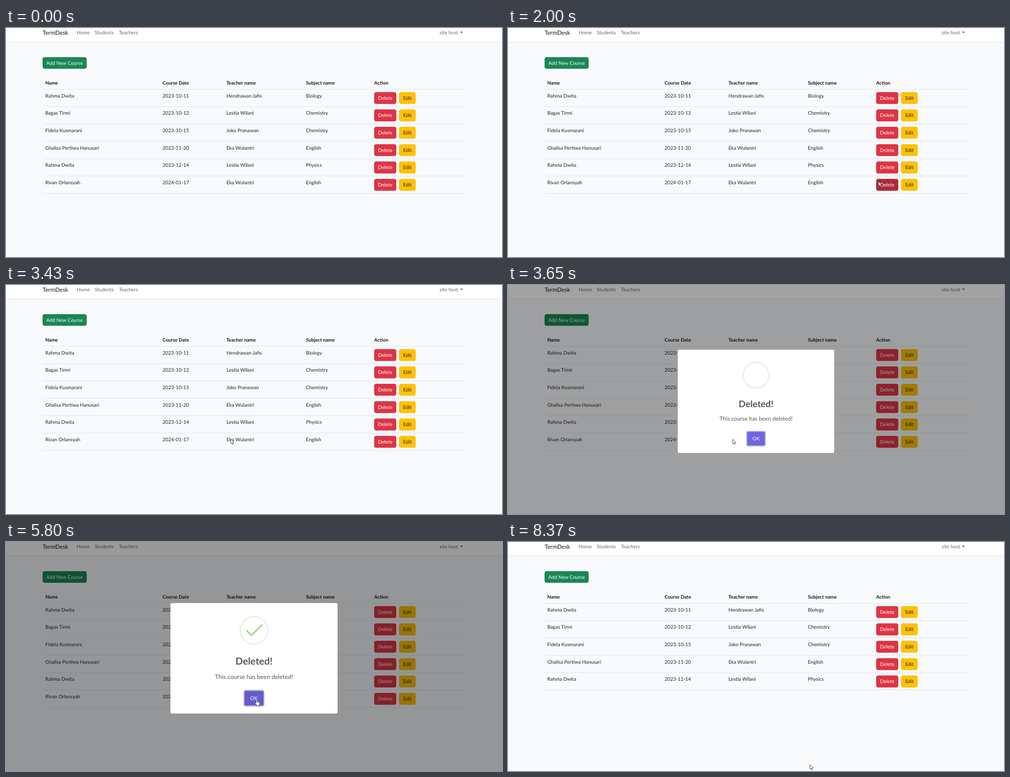
Recreate the animation shown at these times as an HTML page. Size 1098x510 px, loop 9790 ms.

```html
<!DOCTYPE html>
<html lang="en">
<head>
<meta charset="utf-8">
<title>Course list</title>
<style>
  html, body { margin: 0; width: 100%; height: 100%; overflow: hidden; background: #f8fafc; }
  svg { display: block; width: 100vw; height: 100vh; }
  text { font-family: Lato, "Open Sans", sans-serif; font-size: 10.9px; fill: #212529; text-rendering: geometricPrecision; }
  .mid { text-anchor: middle; }
  .head { font-weight: 700; font-size: 10.6px; fill: #16191c; }
  .brand { font-size: 12.9px; fill: #191919; }
  .nav { fill: #666; }
  .white { fill: #fff; }
  .line { stroke: #dee2e6; stroke-width: .9; }
  .bar { fill: #fff; filter: drop-shadow(0 1.4px 1.4px rgba(0, 0, 0, .09)); }
  .title { font-size: 21.5px; font-weight: 700; fill: #595959; }
  .body { font-size: 13.3px; fill: #545454; }
  .action { font-size: 11.6px; fill: #fff; }
</style>
</head>
<body>
<svg id="stage" viewBox="0 0 1098 510" preserveAspectRatio="none"></svg>
<script>
const LOOP = 9790;
const ASK = { open: 2090, close: 3350 };
const DONE = { open: 3560, close: 6100 };
const PITCH = 38.65;
const COLUMNS = [87, 346.5, 488, 664, 815];
const HEADS = ['Name', 'Course Date', 'Teacher name', 'Subject name', 'Action'];
const COURSES = [
  ['Rahma Dwita', '2023-10-11', 'Hendrawan Jafis', 'Biology'],
  ['Bagas Tirmi', '2023-10-12', 'Lestia Wilani', 'Chemistry'],
  ['Fidela Kusmarani', '2023-10-15', 'Joko Pranawan', 'Chemistry'],
  ['Ghalisa Pertiwa Hanusari', '2023-11-20', 'Eka Wulantri', 'English'],
  ['Rahma Dwita', '2023-12-14', 'Lestia Wilani', 'Physics'],
  ['Rivan Orlansyah', '2024-01-17', 'Eka Wulantri', 'English'],
];

// Pointer tip: time, x, y
const PATH = [
  [970, 902, 486], [1120, 870, 455], [1300, 836, 424], [1480, 822, 398], [1700, 820, 342],
  [2150, 820, 342], [2490, 600, 443], [2880, 513, 362], [3010, 513, 362], [3150, 497.5, 343.5],
  [3700, 497.5, 343.5], [4240, 555, 351.5], [6570, 555, 351.5], [6640, 557, 360], [6710, 568, 419],
  [6790, 669, 459], [6880, 773, 405], [6970, 687.5, 352], [7050, 614, 315], [7130, 417, 318],
  [7220, 258, 343], [7310, 153, 365], [7400, 254, 381], [7510, 437, 408], [7590, 537, 399],
  [7700, 696, 345], [7800, 724, 359], [7950, 665, 312], [8370, 668.5, 496],
];
const POP = [[0, .7], [135, 1.05], [240, .95], [300, 1]];

const text = (x, y, cls, label) => `<text x="${x}" y="${y}" class="${cls}">${label}</text>`;
const line = y => `<path class="line" d="M81.500 ${y}H1018.500"/>`;

function button(x, y, w, h, fill, label, { cls = 'white', radius = 4.3, id = '', ring = '' } = {}) {
  const focus = ring && `<rect x="${x - 1.1}" y="${y - 1.1}" width="${w + 2.2}" height="${h + 2.2}"
    rx="${radius + 1.1}" fill="none" stroke="${ring}" stroke-width="2.2"/>`;
  return `${focus}<rect ${id && `id="${id}"`} x="${x}" y="${y}" width="${w}" height="${h}" rx="${radius}" fill="${fill}"/>`
    + text(x + w / 2, y + h / 2 + 3.8, cls + ' mid', label);
}

function row(cells, i) {
  const top = 136.5 + i * PITCH;
  const last = i === COURSES.length - 1;
  return `<g ${last ? 'id="lastRow"' : ''}>`
    + cells.map((cell, c) => text(COLUMNS[c], top + 18.1, '', cell)).join('')
    + button(815, top + 6.2, 49, 26.6, '#dc3545', 'Delete', { id: last ? 'deleteButton' : '' })
    + button(870, top + 6.2, 37, 26.6, '#ffc107', 'Edit', { cls: '' })
    + line(top + PITCH) + '</g>';
}

function dialog(id, icon, title, message, buttons) {
  return `<g id="${id}"><rect x="364" y="136" width="370" height="246" rx="3.6" fill="#fff"/>`
    + icon + text(549, 273.2, 'title mid', title) + text(549, 304.6, 'body mid', message) + buttons + '</g>';
}

const action = (x, w, fill, label, options) =>
  button(x, 331.5, w, 32.8, fill, label, { cls: 'action', radius: 2.9, ...options });

const warningIcon = `<g id="warning">
  <circle cx="549" cy="196.700" r="30.400" fill="none" stroke="#f8ccab" stroke-width="2.900"/>
  <path d="M546.700 182q0-2 2.300-2t2.300 2l-.8 20q-.1 1.500-1.500 1.500t-1.500-1.500z" fill="#f5b08a"/>
  <circle cx="549" cy="209.500" r="2.500" fill="#f5b08a"/></g>`;
const successIcon = `<circle cx="549" cy="196.700" r="30.600" fill="none" stroke="#a5dc86" stroke-opacity=".32" stroke-width="2.900"/>
  <path id="tick" d="M533 197.500L543 208L566.500 185" pathLength="1" stroke-dasharray="1 2" fill="none"
    stroke="#a5dc86" stroke-width="3.600" stroke-linecap="round" stroke-linejoin="round"/>`;

document.getElementById('stage').innerHTML = `
  <rect width="1098" height="510" fill="#f8fafc"/>
  <rect class="bar" x="-5" y="-5" width="1108" height="35.300"/>`
  + text(81, 14.6, 'brand', 'TermDesk') + text(156.5, 14.2, 'nav', 'Home')
  + text(196.5, 14.2, 'nav', 'Students') + text(250, 14.2, 'nav', 'Teachers')
  + text(960, 14.2, 'nav', 'site host') + '<path d="M1005.200 8.300h6.200l-3.100 3.100z" fill="#555"/>'
  + button(81, 65, 97.6, 25.8, '#198754', 'Add New Course')
  + HEADS.map((head, c) => text(COLUMNS[c], 125.6, 'head', head)).join('') + line(136.5)
  + COURSES.map(row).join('')
  + '<rect id="backdrop" width="1098" height="510"/>'
  + dialog('ask', warningIcon, 'Are you sure?', "You won't be able to revert this!",
      action(468, 94, '#3085d6', 'Yes, delete it!', { id: 'yesButton', ring: '#b0cbe5' })
      + action(569.5, 60.5, '#dd3333', 'Cancel'))
  + dialog('done', successIcon, 'Deleted!', 'This course has been deleted!',
      action(528, 42, '#7066e0', 'OK', { id: 'okButton', ring: '#b7b2ef' }))
  + `<g id="pointer" fill="#fff" stroke="#222" stroke-width=".8" stroke-linejoin="round">
    <path id="arrow" d="M0 0v9.900l2.300-2.100 1.700 3.700 1.600-.7-1.700-3.500h3.200z"/>
    <path id="hand" d="M-1.300 1q0-1.300 1.200-1.300T1.100 1v3.600q1.100-.7 2 .2 1.200-.5 1.900.4 1.700-.4 1.700 1.300v2.400l-1.200 2.700v1.400H-.6v-1.400L-3.800 7.500q-.2-1.200 1-1.200l1.500 1.100z"/></g>`;

const el = Object.fromEntries([...document.querySelectorAll('[id]')].map(node => [node.id, node]));
const clamp = v => Math.min(1, Math.max(0, v));
const easeOut = v => 1 - (1 - clamp(v)) ** 3;
const within = (t, from, to) => t >= from && t < to;
const show = (node, on) => node.setAttribute('visibility', on ? 'visible' : 'hidden');

// Values at a time, interpolated between keyed points
function track(points, t) {
  const next = points.findIndex(p => p[0] > t);
  if (next === 0) return points[0].slice(1);
  if (next < 0) return points.at(-1).slice(1);
  const a = points[next - 1], b = points[next];
  const part = (t - a[0]) / (b[0] - a[0]);
  return a.slice(1).map((v, i) => v + (b[i + 1] - v) * part);
}

function drawDialog(node, span, t) {
  const open = within(t, span.open, span.close);
  node.setAttribute('display', open ? 'inline' : 'none');
  const [scale] = track(POP, t - span.open);
  node.setAttribute('transform', `translate(549 259) scale(${scale}) translate(-549 -259)`);
  return open ? clamp((t - span.open) / 100) : 0;
}

function draw(t) {
  show(el.lastRow, t < DONE.close);
  el.deleteButton.setAttribute('fill', within(t, 1910, ASK.open) ? '#b02a37'
    : within(t, 1640, 1910) ? '#bb2d3b' : '#dc3545');

  const dim = drawDialog(el.ask, ASK, t) + drawDialog(el.done, DONE, t);
  el.backdrop.setAttribute('fill-opacity', .4 * dim);

  const reveal = easeOut((t - ASK.open) / 500);
  const tilt = Math.cos((1 - reveal) * 100 * Math.PI / 180);
  el.warning.setAttribute('opacity', reveal);
  el.warning.setAttribute('transform', `translate(0 196.7) scale(1 ${tilt}) translate(0 -196.7)`);
  const drawn = clamp((t - DONE.open - 300) / 400);
  show(el.tick, drawn > 0 && t < DONE.close);
  el.tick.setAttribute('stroke-dashoffset', 1 - drawn);

  const overYes = within(t, 2850, ASK.close);
  const overOk = within(t, 4100, DONE.close);
  el.yesButton.setAttribute('fill', overYes ? '#2b78c1' : '#3085d6');
  el.okButton.setAttribute('fill', within(t, 4930, 5060) ? '#5a52b3' : overOk ? '#655cca' : '#7066e0');

  const [x, y] = track(PATH, t);
  const hand = overYes || within(t, 4100, 6430);
  el.pointer.setAttribute('transform', `translate(${x} ${y})`);
  show(el.hand, t >= PATH[0][0] && hand);
  show(el.arrow, t >= PATH[0][0] && !hand);
}

function frame(now) {
  draw(now % LOOP);
  requestAnimationFrame(frame);
}
draw(0);
requestAnimationFrame(frame);
</script>
</body>
</html>
```
